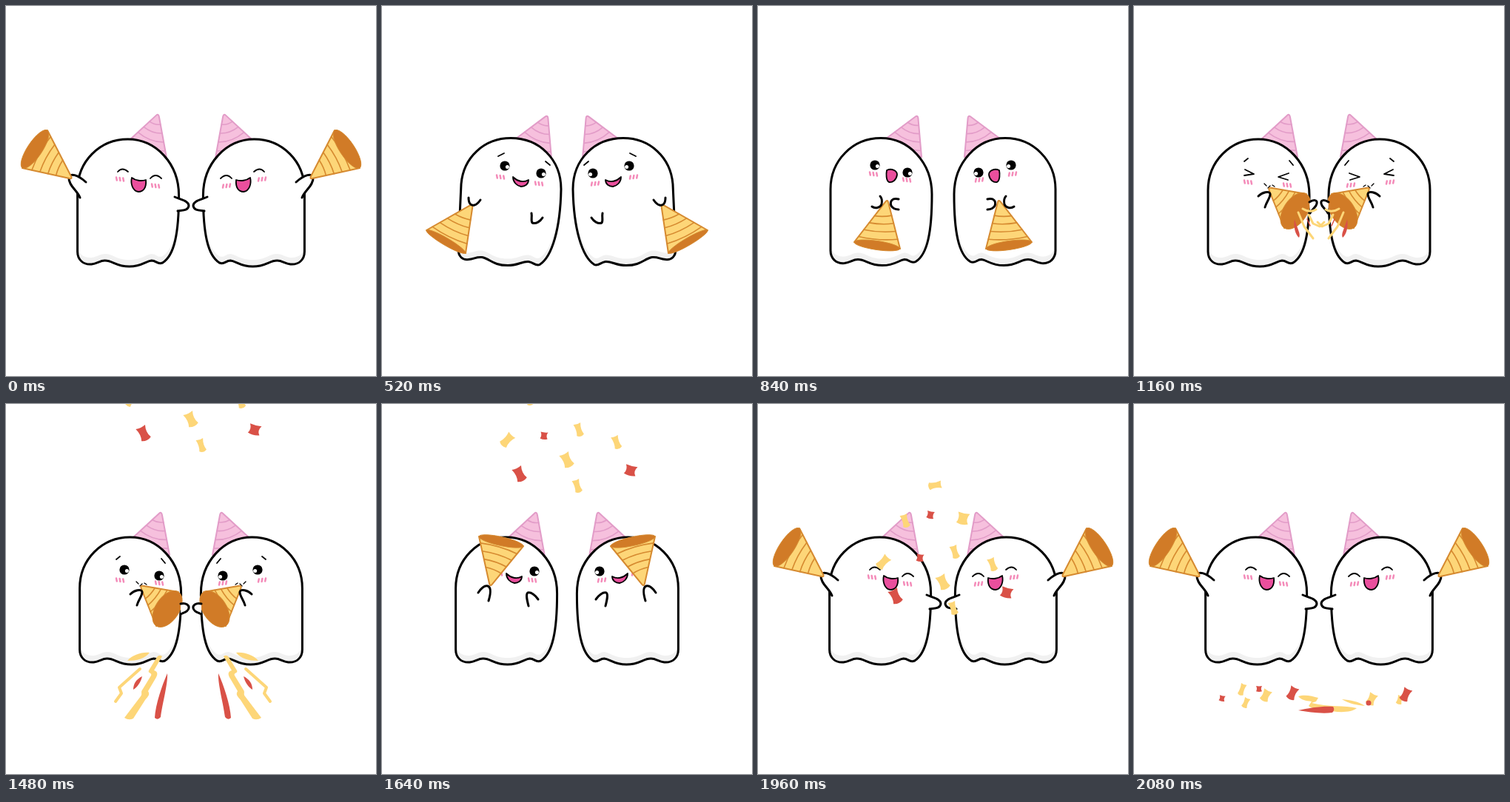
Write an HTML page with a canvas that moves like this. It is 500x500 px and loops after 2200 ms.

```html
<!DOCTYPE html>
<html lang="en">
<head>
<meta charset="utf-8">
<title>Party ghosts</title>
<style>
html, body { margin: 0; width: 100%; height: 100%; overflow: hidden; background: #fff; }
canvas { display: block; width: 100vw; height: 100vh; }
</style>
</head>
<body>
<canvas id="stage" width="500" height="500"></canvas>
<script>
const ctx = document.getElementById('stage').getContext('2d');
const LOOP = 2200;
const INK = '#000', WHITE = '#fff', SHADE = '#f1f1f1';
const PINK = '#f6c0dd', PINK_LINE = '#e29cc8', BLUSH = '#f48bb9', MOUTH = '#ea4f9d';
const GOLD = '#fdd678', GOLD_LINE = '#d68a30', RUST = '#d17b27', RED = '#d95147';

const BODY = 'M98 247 L98 330 C98 341 106 348 117 347 C125 346 128 342 135 342 C146 342 150 350 168 350 C185 350 190 343 198 342 C205 342 206 348 213 345 C229 335 235 305 235 254 C235 211 204 178 166 178 C128 178 98 208 98 247Z';
const LEAN = 'M107 240 L103 328 C103 338 109 343 117 342 C125 341 128 338 135 339 C146 341 150 350 170 350 C184 350 190 344 198 345 C205 346 207 351 213 349 C230 338 241 300 242 247 C242 206 212 178 174 178 C138 178 110 204 107 240Z';
const SMILE = 'M0 0 C6 6 14 8 21 4 C21 10 16 13 11 13 C5 12 0 7 0 0Z';
const LAUGH = 'M0 0 C5 4 13 5 19 3 C20 13 16 19 9 19 C1 18 -2 8 0 0Z';
const GASP = 'M0 0 C6 -3 14 0 14 6 C13 13 8 17 3 16 C-1 14 -1 5 0 0Z';

function shape(d, fill, stroke, width = 3) {
  const p = new Path2D(d);
  if (fill) { ctx.fillStyle = fill; ctx.fill(p); }
  if (stroke) { ctx.strokeStyle = stroke; ctx.lineWidth = width; ctx.stroke(p); }
}

function at(x, y, draw, scale = 1, angle = 0) {
  ctx.save();
  ctx.translate(x, y);
  ctx.rotate(angle);
  ctx.scale(scale, scale);
  draw();
  ctx.restore();
}

// Striped cone given by its tip and both base corners.
function cone([tx, ty, ax, ay, bx, by], fill, line, stripes, bow) {
  const mx = (ax + bx) / 2, my = (ay + by) / 2;
  const len = Math.hypot(mx - tx, my - ty);
  const onA = k => [tx + (ax - tx) * k, ty + (ay - ty) * k].join(' ');
  const onB = k => [tx + (bx - tx) * k, ty + (by - ty) * k].join(' ');
  const onAxis = k => [tx + (mx - tx) * k, ty + (my - ty) * k].join(' ');
  const tip = 4 / len;
  shape(`M${onA(tip)} L${onA(1)} L${onB(1)} L${onB(tip)} Q${tx} ${ty} ${onA(tip)}Z`, fill, line, 2);
  for (const k of stripes) {
    shape(`M${onA(k + 0.03)} Q${onAxis(k + k * bow / len)} ${onB(k - 0.03)}`, null, line, 1.6);
  }
}

function horn(pts, depth) {
  const [, , ax, ay, bx, by] = pts;
  cone(pts, GOLD, GOLD_LINE, [0.36, 0.52, 0.68, 0.84], 5);
  ctx.beginPath();
  ctx.ellipse((ax + bx) / 2, (ay + by) / 2, Math.hypot(bx - ax, by - ay) / 2, depth, Math.atan2(by - ay, bx - ax), 0, Math.PI * 2);
  ctx.fillStyle = RUST;
  ctx.fill();
  ctx.strokeStyle = GOLD_LINE;
  ctx.lineWidth = 1;
  ctx.stroke();
}

function dot(x, y, r, color) {
  ctx.fillStyle = color;
  ctx.beginPath();
  ctx.arc(x, y, r, 0, Math.PI * 2);
  ctx.fill();
}

function eye(x, y) {
  dot(x, y, 6.6, INK);
  dot(x + 3.4, y + 1.6, 2.5, WHITE);
}

function blush(x, y) {
  for (const i of [-1, 0, 1]) {
    shape(`M${x + i * 4.6 - 0.4} ${y - 2 + i * 0.4} l0.8 4`, null, BLUSH, 2.5);
  }
}

const openEyes = (...pts) => () => { for (const [x, y] of pts) eye(x, y); };
const lineEyes = d => () => shape(d, null, INK, 1.8);

const puffed = {
  dx: 1.6, dy: 2,
  hat: [210, 145, 170, 182, 221, 204],
  horn: [181, 245, 233, 254, 203, 300], depth: 16,
  arms: 'M168 257 C173 252 183 249 184 254 C184 260 179 264 177 272 M236 270 C243 268 248 272 247 276 C246 281 240 282 236 284',
  eyes: openEyes([160, 224], [207, 232]),
  brows: 'M149 210 L154 206 M210 209 L215 215',
  marks: 'M176 240 L179 243 M181 246 L184 243 M187 242 L190 244',
  cheeks: [154, 238, 207, 242]
};

const cheer = {
  dx: -1.4, dy: 2,
  hat: [206, 145, 167, 181, 217, 205],
  horn: [90, 234, 56, 168, 22, 219], depth: 10, hornLast: true,
  arms: 'M100 259 C97 250 84 242 85 232 C86 225 97 228 108 238 M228 258 C236 262 247 263 247 270 C246 277 238 276 232 277',
  eyes: lineEyes('M151 224 Q157 217 165 224 M195 233 Q202 225 210 233'),
  mouth: [LAUGH, 170, 232], cheeks: [154, 234, 202, 243]
};

const hold = {
  dx: 0, dy: 0.6,
  hat: [216, 147, 172, 180, 221, 204],
  horn: [175, 261, 130, 319, 192, 328], depth: 6,
  arms: 'M154 271 C158 274 165 273 167 268 C168 263 167 259 165 257 M190 261 C181 259 178 264 180 270 C183 275 187 275 190 275',
  eyes: openEyes([158, 215], [202, 225]),
  mouth: [GASP, 174, 222], cheeks: [156, 227, 201, 235]
};

const low = {
  body: LEAN, dx: 0, dy: 0.6,
  hat: [224, 147, 180, 180, 229, 206],
  horn: [123, 267, 60, 303, 113, 334], depth: 5,
  arms: 'M117 259 C117 268 121 270 125 269 C129 268 131 265 133 262 M202 280 C203 285 201 290 203 293 C208 295 214 291 217 286',
  eyes: openEyes([166, 216], [215, 226]),
  brows: 'M157 203 L165 199 M221 210 L227 215',
  mouth: [SMILE, 177, 231], cheeks: [160, 231, 212, 240]
};

const turn = {
  ...hold,
  hat: [219, 147, 175, 180, 224, 205],
  horn: [152, 265, 101, 312, 158, 332], depth: 5,
  arms: 'M141 268 C143 275 150 275 155 270 C157 267 158 264 158 261 M193 269 C188 272 188 281 191 284 C196 285 201 282 204 279',
  mouth: [SMILE, 170, 228]
};

const blow = {
  ...puffed, dx: 2,
  arms: 'M168 257 C173 252 183 249 184 254 C184 260 179 264 177 272 M237 265 C243 261 248 262 247 267 C246 273 241 273 238 280',
  eyes: lineEyes('M150 221 L162 227 L149 229 M209 226 L195 231 L208 235')
};

const lift = {
  ...puffed,
  hat: [209, 145, 168, 183, 220, 206],
  horn: [146, 247, 131, 179, 191, 192], depth: 6,
  arms: 'M130 255 C134 249 139 245 143 246 C148 248 147 256 144 266 M198 273 C196 265 194 257 197 255 C202 254 208 260 211 264',
  eyes: openEyes([161, 217], [206, 226]),
  brows: '', marks: '',
  mouth: [SMILE, 168, 229], cheeks: [157, 229, 203, 238]
};

const POSES = [[0, cheer], [520, low], [680, turn], [840, hold], [1000, puffed], [1080, blow], [1480, puffed], [1640, lift], [1960, cheer]];
const DROPS = [[0, null], [1400, -165], [1480, -110], [1640, -55], [1720, -28], [1800, 0], [1840, 40], [1920, 110], [2000, 180], [2080, null]];

function pick(track, t) {
  let value = track[0][1];
  for (const [start, v] of track) if (t >= start) value = v;
  return value;
}

function ghost(p) {
  cone(p.hat, PINK, PINK_LINE, [0.28, 0.48, 0.68, 0.88], 10);

  const path = p.body || BODY;
  ctx.save();
  ctx.translate(p.dx, p.dy);
  shape(path, SHADE);
  ctx.clip(new Path2D(path));
  ctx.translate(0, -9);
  shape(path, WHITE);
  ctx.fillRect(90, 170, 160, 110);
  ctx.restore();
  at(p.dx, p.dy, () => shape(path, null, INK));

  p.eyes();
  if (p.brows) shape(p.brows, null, INK, 1.8);
  if (p.marks) shape(p.marks, null, INK, 1.3);
  if (p.mouth) at(p.mouth[1], p.mouth[2], () => shape(p.mouth[0], MOUTH, INK, 1.8));
  const [x1, y1, x2, y2] = p.cheeks;
  blush(x1, y1);
  blush(x2, y2);

  if (!p.hornLast) horn(p.horn, p.depth);
  shape(p.arms, WHITE, INK);
  if (p.hornLast) horn(p.horn, p.depth);
}

function puff() {
  shape('M228 274 Q238 280 246 275 M222 279 L230 298 L242 314 M236 282 L242 294 L251 298 L257 292', null, GOLD, 3);
  shape('M234 288 L238 297', null, RED, 1.5);
  shape('M217 288 C215 298 218 309 223 313 C226 308 220 300 217 288Z', RED);
}

// Streamers, drawn with their upper end at the origin.
function streamers() {
  shape('M-9 2 Q-6 -2 -2 1 L-13 20 C-7 22 -8 26 -11 31 L-21 48 C-18 53 -21 55 -25 60 L-41 85 Q-47 88 -53 84 L-31 55 C-28 51 -32 50 -28 45 L-17 27 C-15 23 -22 24 -20 20Z', GOLD);
  shape('M-32 18 L-60 43 L-57 51 L-65 62', null, GOLD, 4);
  shape('M-49 7 C-42 -1 -30 -5 -19 -4 C-25 4 -36 7 -49 7Z', GOLD);
  shape('M-29 28 C-37 32 -41 38 -41 46 C-35 42 -31 36 -29 28Z', RED);
  shape('M5 24 C-2 40 -11 66 -12 84 Q-8 88 -4 83 C-2 66 6 38 5 24Z', RED);
}

function burst(t) {
  if (t < 1160) at(222, 280, () => at(-222, -280, puff), 0.6);
  else if (t < 1320) puff();
  else if (t < 1400) at(215, 285, streamers, 0.75);
  else if (t < 1480) at(214, 315, streamers, 0.9);
  else at(213, 340, streamers);
}

function scrap(x, y, w, h, angle, color) {
  at(x, y, () => shape(`M${-w} ${-h} Q0 ${-h * 0.8} ${w} ${-h} Q${w * 0.4} 0 ${w} ${h * 0.8} Q0 ${h * 1.2} ${-w} ${h * 0.8} Q${-w * 0.5} 0 ${-w} ${-h}Z`, color), 1, angle);
}

function rain(drop) {
  const put = (x, y, ...rest) => scrap(x, y + drop, ...rest);
  put(239, 0, 5, 9, 1.4, GOLD);
  put(199, 48, 5, 9, -0.3, GOLD);
  put(233, 40, 5, 5, 0.2, RED);
  put(277, 45, 8, 8, 0.2, GOLD);
  put(169, 104, 6, 10, 0.75, GOLD);
  put(219, 98, 5, 5, 0.1, RED);
  put(266, 90, 5, 9, -0.3, GOLD);
  put(317, 107, 5, 9, -0.35, GOLD);
  put(250, 131, 7, 10, -0.45, GOLD);
  put(186, 150, 7, 10, -0.45, RED);
  put(336, 145, 8, 7, 0.25, RED);
  put(264, 166, 5, 9, -0.3, GOLD);
}

function pile() {
  scrap(119, 398, 4, 4, 0.2, RED);
  scrap(146, 386, 4, 8, 0.35, GOLD);
  scrap(151, 404, 4, 7, 0.4, GOLD);
  scrap(169, 385, 4, 4, 0, RED);
  scrap(178, 394, 6, 8, 0.45, GOLD);
  scrap(214, 391, 6, 9, 0.45, RED);
  scrap(359, 400, 4, 6, 0.3, GOLD);
  scrap(367, 393, 6, 9, 0.45, RED);
  scrap(321, 399, 6, 8, 0.45, GOLD);
  dot(317, 404, 3.5, RED);
  shape('M222 395 C231 392 241 395 249 397 L246 402 L240 404 C262 410 285 407 301 411 C293 418 272 417 257 413 C248 411 240 412 236 408 L240 402 C232 401 226 400 222 395Z', GOLD);
  shape('M281 399 C292 400 304 402 312 408 C302 407 290 405 281 399Z', GOLD);
  shape('M222 414 C236 411 254 408 269 409 Q272 413 268 417 C252 419 236 416 222 414Z', RED);
}

// Draws once as is and once mirrored; width is the span being mirrored.
function both(draw, width = 500) {
  draw();
  ctx.save();
  ctx.translate(width, 0);
  ctx.scale(-1, 1);
  draw();
  ctx.restore();
}

function frame() {
  const t = performance.now() % LOOP;
  ctx.fillStyle = WHITE;
  ctx.fillRect(0, 0, 500, 500);
  ctx.lineCap = ctx.lineJoin = 'round';
  const pose = pick(POSES, t), drop = pick(DROPS, t);
  both(() => ghost(pose));
  if (t >= 1080 && t < 1640) both(() => burst(t), 505);
  if (drop !== null) rain(drop);
  if (t >= 2080) pile();
  requestAnimationFrame(frame);
}
frame();
</script>
</body>
</html>
```
